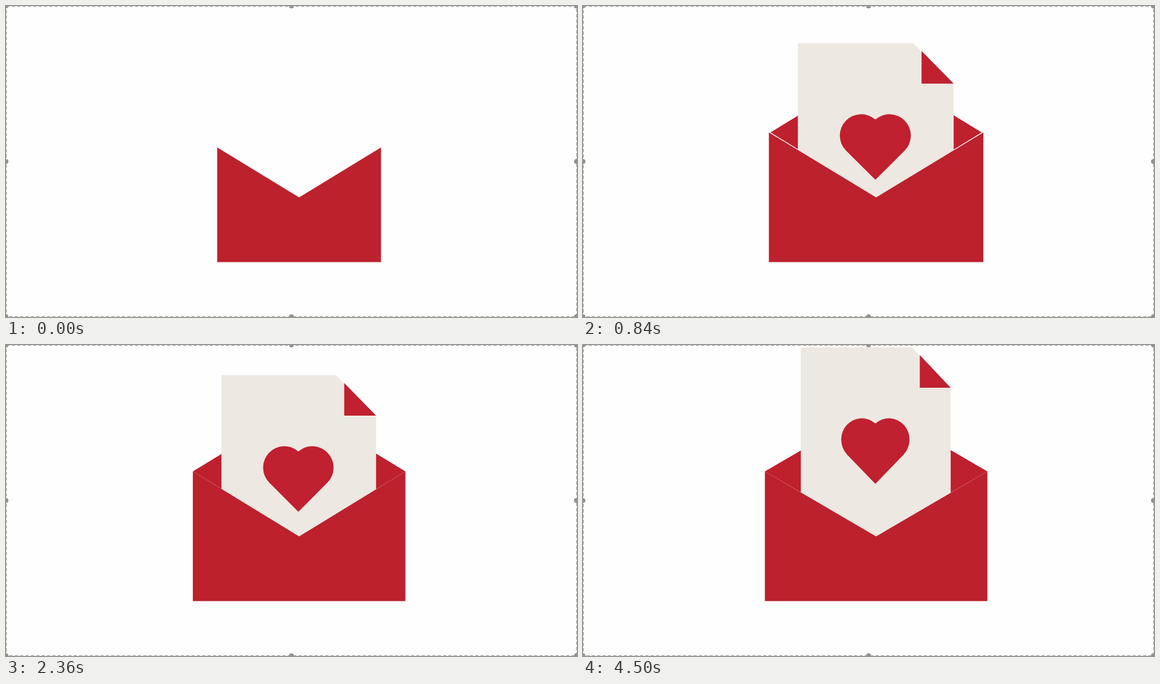
An HTML page for the animation above (4.53 s loop, 960 by 524 pixels).

```html
<!DOCTYPE html>
<html lang="en">
<head>
<meta charset="utf-8">
<title>Love letter</title>
<style>
html, body { margin: 0; width: 100%; height: 100%; overflow: hidden; background: #fefefe; }
svg { display: block; width: 100vw; height: 100vh; }
</style>
</head>
<body>
<svg viewBox="0 0 960 524">
  <defs>
    <clipPath id="slot"><rect id="mask" y="-500" height="932"/></clipPath>
    <clipPath id="floor"><rect y="-500" width="960" height="930"/></clipPath>
  </defs>
  <rect width="960" height="524" fill="#fefefe"/>
  <g clip-path="url(#slot)"><path id="back" fill="#bf202e"/></g>
  <g clip-path="url(#floor)">
    <g id="paper">
      <path d="M-131-230H63L131-162V108H-131Z" fill="#ede8e1"/>
      <path d="M77-217V-162H131Z" fill="#c0202f"/>
      <path d="M-.7 0L-50.3-49.5A36 36 0 0 1-.7-101.6A36 36 0 0 1 48.9-49.5Z" fill="#c0202f"/>
    </g>
  </g>
  <g clip-path="url(#slot)"><path id="front" fill="#bc212d"/></g>
  <rect x=".5" y=".5" width="959" height="523" fill="none" stroke="#8c8c8c" stroke-dasharray="6 3"/>
  <g id="grips" fill="#919191"></g>
</svg>
<script>
const LOOP = 4530, MID = 492.8, SHOULDER = 213, BASE = 431.5;
const $ = id => document.getElementById(id);

// Keys are [time, value] pairs; turning points get a flat tangent.
function track(...keys) {
  const last = keys.length - 1;
  const slope = i => (keys[i + 1][1] - keys[i][1]) / (keys[i + 1][0] - keys[i][0]);
  const tangents = keys.map((k, i) => {
    if (i === 0) return slope(0);
    if (i === last) return slope(last - 1);
    const a = slope(i - 1), b = slope(i);
    return a * b <= 0 ? 0 : 2 * a * b / (a + b);
  });
  return t => {
    if (t >= keys[last][0]) return keys[last][1];
    let i = 0;
    while (t >= keys[i + 1][0]) i++;
    const [t0, v0] = keys[i], [t1, v1] = keys[i + 1];
    const d = t1 - t0, u = (t - t0) / d, r = 1 - u;
    return v0 * (1 + 2 * u) * r * r + tangents[i] * d * u * r * r
         + v1 * u * u * (3 - 2 * u) - tangents[i + 1] * d * u * u * r;
  };
}

const heartTip = track([0, -270], [300, 53], [600, 322], [840, 293], [1260, 230],
  [1860, 301], [2350, 281], [2700, 285], [3740, 285], [4500, 234], [4530, 231]);
const paperHalf = track([0, 137.5], [300, 131], [600, 136], [840, 131], [1260, 125.2],
  [1860, 137.2], [2350, 130], [2700, 131], [3740, 131], [4500, 126], [4530, 125.7]);
const frontHalf = track([0, 179], [300, 179], [600, 185], [840, 180.3], [1260, 143.5],
  [1860, 178], [2700, 178.8], [3740, 178.8], [4500, 187], [4530, 187.5]);
const backHalf = track([0, 179], [300, 179], [600, 183], [840, 177.5], [1260, 143.5],
  [1860, 178], [2700, 178.8], [3740, 178.8], [4500, 187], [4530, 187.5]);
const backDrop = track([0, -440], [300, -117.5], [460, 0], [LOOP, 0]);
const slotHalf = track([0, 137.7], [300, 129.8], [480, 200], [LOOP, 200]);

// Body outline whose top edge meets at the given height in the middle.
const body = (half, peak, dy = 0) =>
  `M${MID - half} ${BASE + dy}V${SHOULDER + dy}L${MID} ${peak + dy}L${MID + half} ${SHOULDER + dy}V${BASE + dy}Z`;

function draw(t) {
  const slot = slotHalf(t);
  $('mask').setAttribute('x', MID - slot);
  $('mask').setAttribute('width', slot * 2);
  // Once settled, the back only shows its raised flap above the pocket.
  const drop = backDrop(t), half = backHalf(t);
  $('back').setAttribute('d', drop < 0
    ? body(half, 104, drop)
    : `M${MID - half} ${SHOULDER}L${MID} 104L${MID + half} ${SHOULDER}L${MID} 322Z`);
  $('front').setAttribute('d', body(frontHalf(t), 322.5));
  $('paper').setAttribute('transform',
    `translate(492.2 ${heartTip(t)}) scale(${paperHalf(t) / 131} 1)`);
}

for (const x of [0, 480, 960]) for (const y of [0, 262, 524]) {
  if (x === 480 && y === 262) continue;
  const dot = document.createElementNS('http://www.w3.org/2000/svg', 'circle');
  dot.setAttribute('cx', x === 960 ? 959 : x);
  dot.setAttribute('cy', y === 524 ? 523.5 : y);
  dot.setAttribute('r', 4);
  $('grips').append(dot);
}

const start = performance.now();
function tick() {
  draw((performance.now() - start) % LOOP);
  requestAnimationFrame(tick);
}
draw(0);
requestAnimationFrame(tick);
</script>
</body>
</html>
```
